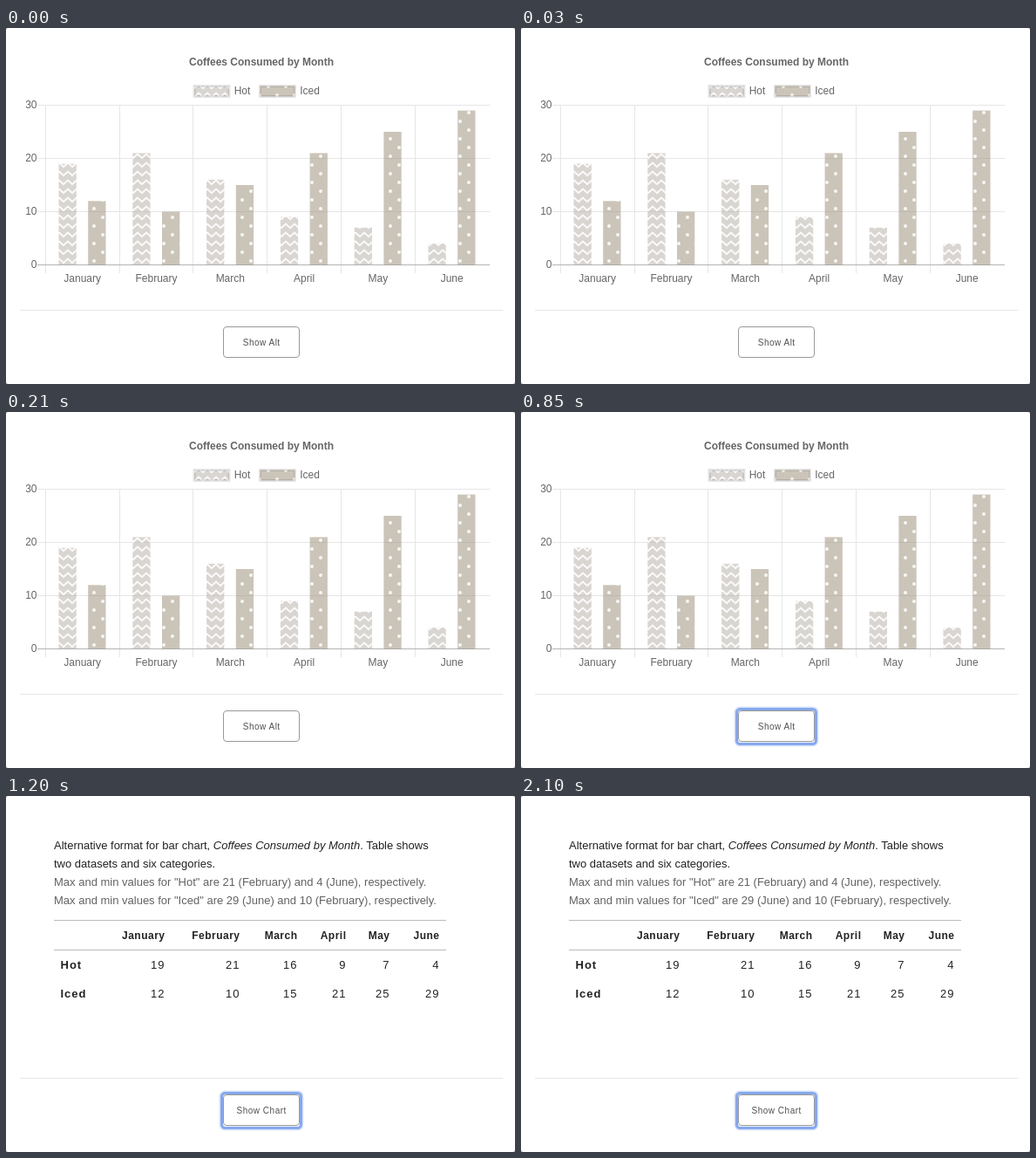
Animation of 584x408 px, one loop 2.7 s. Source, as an HTML page:

```html
<!DOCTYPE html>
<html lang="en">
<head>
<meta charset="utf-8">
<title>Coffees Consumed by Month</title>
<style>
  html, body { margin: 0; width: 100%; height: 100%; overflow: hidden; background: #999; }
  svg { display: block; font: 12px "Liberation Sans", Arial, sans-serif; fill: #666; }
  .bold { font-weight: bold; }
  .mid { text-anchor: middle; }
  .end { text-anchor: end; }
  #alt { font-size: 13px; fill: #222; }
  #alt .soft { fill: #626262; }
  #alt .head { font-size: 12px; letter-spacing: .5px; }
  #alt .cell { letter-spacing: 1px; }
  #label { font-size: 10px; letter-spacing: .5px; fill: #505050; }
</style>
</head>
<body>
<svg width="584" height="408" viewBox="0 0 584 408">
  <defs>
    <pattern id="hot" x="16" y="22" width="10" height="10" patternUnits="userSpaceOnUse">
      <rect width="10" height="10" fill="rgba(179,171,163,.5)"/>
      <path d="M-2 9 L0 7 L5 2.5 L10 7 L12 9" fill="none" stroke="#fff" stroke-opacity=".9" stroke-width="2"/>
    </pattern>
    <pattern id="iced" x="16" y="22" width="20" height="20" patternUnits="userSpaceOnUse">
      <rect width="20" height="20" fill="rgba(151,137,115,.5)"/>
      <g fill="#fff" fill-opacity=".85"><circle cx="5" cy="5" r="2"/><circle cx="15" cy="15" r="2"/></g>
    </pattern>
  </defs>
  <rect width="584" height="408" rx="3" fill="#fff"/>
  <g id="chart"></g>
  <g id="alt"></g>
  <path d="M16 323.5H570" stroke="#e6e6e6"/>
  <g id="ring" fill="none" stroke="#86a8ec">
    <rect x="247" y="340" width="92" height="41" rx="4" stroke-width="5" stroke-opacity=".3"/>
    <rect x="247.5" y="340.5" width="91" height="40" rx="4" stroke-width="3"/>
  </g>
  <rect x="249.5" y="342.5" width="87" height="35" rx="3.5" fill="#fff" stroke="#999"/>
  <text id="label" class="mid" x="293.2" y="364"></text>
</svg>
<script>
const $ = id => document.getElementById(id);
const months = ['January', 'February', 'March', 'April', 'May', 'June'];
const series = { Hot: [19, 21, 16, 9, 7, 4], Iced: [12, 10, 15, 21, 25, 29] };
const names = Object.keys(series);

const text = (x, y, s, cls = '') => `<text x="${x}" y="${y}" class="${cls}">${s}</text>`;
const line = (d, color) => `<path d="${d}" stroke="${color}"/>`;
const rect = (x, y, w, h, name, extra = '') =>
  `<rect x="${x}" y="${y}" width="${w}" height="${h}" fill="url(#${name.toLowerCase()})" ${extra}/>`;

function chart() {
  const left = 45.3, step = 84.8, base = 271.5, unit = 6.1;
  let out = text(293, 43, 'Coffees Consumed by Month', 'bold mid');
  names.forEach((name, k) => {
    const x = 216 + 75.5 * k;
    out += rect(x, 66.5, 40, 12, name, 'stroke="#000" stroke-opacity=".1" stroke-width="3"');
    out += text(x + 45.7, 76, name);
  });
  months.forEach((month, i) => {
    const x = Math.floor(left + step * i) + .5;
    out += line(`M${x} 88V281`, '#e6e6e6') + text(left + step * (i + .5), 291, month, 'mid');
  });
  for (let v = 0; v <= 30; v += 10) {
    const y = base - v * unit;
    out += line(`M36 ${y}H555`, v ? '#e6e6e6' : '#b4b4b4') + text(35.5, y + 3.8, v, 'end');
  }
  names.forEach((name, k) => series[name].forEach((v, i) => {
    out += rect(left + step * i + 15.2 + 33.7 * k, base - v * unit, 20.3, v * unit, name);
  }));
  return out;
}

function table() {
  const range = name => {
    const data = series[name], hi = Math.max(...data), lo = Math.min(...data);
    const at = v => `${v} (${months[data.indexOf(v)]})`;
    return `Max and min values for "${name}" are ${at(hi)} and ${at(lo)}, respectively.`;
  };
  const right = [182.5, 268.5, 334.5, 390.5, 440.5, 497.5];
  let out = text(55, 61, 'Alternative format for bar chart, ' +
    '<tspan font-style="italic">Coffees Consumed by Month</tspan>. Table shows');
  out += text(55, 82, 'two datasets and six categories.');
  out += line('M55 142.5H505', '#bbb') + line('M55 176.5H505', '#bbb');
  months.forEach((month, i) => out += text(right[i], 164, month, 'bold head end'));
  names.forEach((name, k) => {
    const y = 198 + 33 * k;
    out += text(55, 103 + 21 * k, range(name), 'soft') + text(62.5, y, name, 'bold cell');
    series[name].forEach((v, i) => out += text(right[i], y, v, 'cell end'));
  });
  return out;
}

$('chart').innerHTML = chart();
$('alt').innerHTML = table();

const show = (id, on) => $(id).style.display = on ? '' : 'none';
const start = performance.now();
function frame() {
  const t = (performance.now() - start) % 2700;
  const swapped = t >= 1200;
  show('chart', !swapped);
  show('alt', swapped);
  show('ring', t >= 330);
  $('label').textContent = swapped ? 'Show Chart' : 'Show Alt';
  requestAnimationFrame(frame);
}
frame();
</script>
</body>
</html>
```
